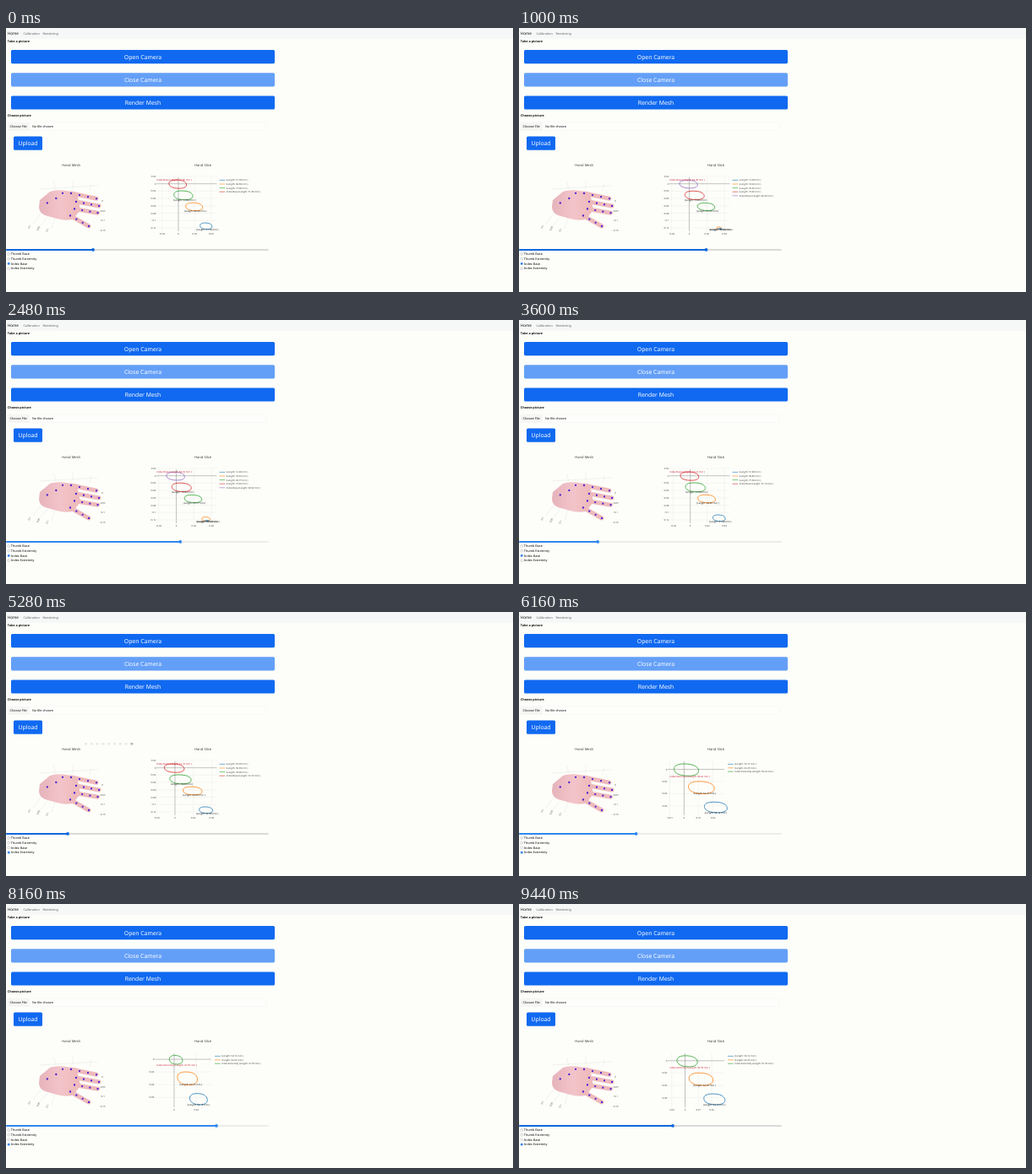
An HTML page for the animation above (9.8 s loop, 600 by 313 pixels).

```html
<!DOCTYPE html>
<html lang="en">
<head>
<meta charset="utf-8">
<title>Hand slices</title>
<style>
  html, body { margin: 0; width: 100%; height: 100%; overflow: hidden; background: #fdfefa; }
  svg { display: block; width: 600px; height: 313px; font: 3.75px "Noto Sans", sans-serif; fill: #111; text-rendering: geometricPrecision; }
  .button text { font-size: 6.85px; fill: #fff; text-anchor: middle; }
  .plot { font-family: "Open Sans", sans-serif; font-size: 2.85px; }
  .title { font-size: 4.1px; text-anchor: middle; }
</style>
</head>
<body>
<svg viewBox="0 0 600 313">
  <defs>
    <linearGradient id="skin">
      <stop offset="0" stop-color="#e6b3ba"/>
      <stop offset=".5" stop-color="#f2c4c9"/>
      <stop offset="1" stop-color="#eeb9b9"/>
    </linearGradient>
  </defs>
  <rect width="600" height="12.5" fill="#f6f8f7"/>
  <text x="1.8" y="7.8" font-size="4.6" font-weight="500">Home</text>
  <g fill="#666"><text x="20.5" y="7.6">Calibration</text><text x="43.5" y="7.6">Rendering</text></g>
  <g font-weight="700"><text x="1.8" y="17.2">Take a picture</text><text x="1.8" y="104.8">Choose picture</text></g>
  <g id="buttons" class="button"></g>
  <rect x="2" y="112" width="306" height="9.6" rx="1.2" fill="#fefefc" stroke="#ecedeb" stroke-width=".4"/>
  <rect x="2.2" y="112.2" width="25.6" height="9.2" fill="#f5f6f4"/>
  <text x="4.6" y="118.2">Choose File</text><text x="31" y="118.2">No file chosen</text>
  <g class="plot">
    <g class="title" fill="#333"><text x="77.2" y="164.3">Hand Mesh</text><text x="233" y="164.3">Hand Slice</text></g>
    <path d="M56 182l3 9M79 181v10M101 184l-2 9M39 191l70-4M32 232l10-14M41 234l8-10M54 238l4-13" fill="none" stroke="#dedede" stroke-width=".4"/>
    <path d="M40 204L52 194Q58 191.500 68 192.500L84 195L88 216L79 227Q70 229 60 226L46 222Q39 219 39 212Z" fill="url(#skin)"/>
    <g id="hand"></g>
    <g id="meshLabels" text-anchor="middle" fill="#444"></g>
    <g id="modebar" fill="#b8bab8"></g>
    <g id="chart"></g>
  </g>
  <rect id="track" y="262" width="311" height="1.9" rx=".9"/>
  <g id="thumb"><rect id="fill" y="262" height="1.9" rx=".9"/><circle id="knob" cy="262.900" r="1.900"/></g>
  <g id="radios"></g>
</svg>
<script>
const el = id => document.getElementById(id);
const text = (x, y, s, extra = '') => `<text x="${x}" y="${y}" ${extra}>${s}</text>`;
const lerp = (a, b, f) => a + (b - a) * f;
const clamp = (v, lo, hi) => Math.min(hi, Math.max(lo, v));

const LOOP = 9800, START = 103;
const COLORS = ['#1f77b4', '#ff7f0e', '#2ca02c', '#d62728', '#9467bd'];
const OPTIONS = ['Thumb Base', 'Thumb Extremity', 'Index Base', 'Index Extremity'];

// Slider drags: start, end, final position
const DRAGS = [[80, 1000, 221.5], [1080, 1560, 236], [1800, 2760, 194], [2800, 3760, 73],
  [5640, 6600, 194], [6640, 7520, 262], [7680, 8640, 236], [8680, 9440, 182]];

// Finger cross-sections from index to little finger: x, y, rx, ry in axis steps
const BASE = [[-.04, .05, .53, .57], [.3, 1.57, .57, .61], [.96, 3.13, .51, .54], [1.69, 5.75, .36, .43]];
const TIPS = [[.16, .04, .7, .41], [1.2, 1.5, .9, .51], [2.2, 3.13, .79, .44]];

// Knuckle and tip of each finger of the mesh
const FINGERS = [[77, 196, 107, 202.3], [83, 206, 110, 211], [81, 214.5, 108.5, 219.2], [76, 222.5, 98, 235]];

function slider(t) {
  let x = START;
  for (const [from, to, end] of DRAGS) x = lerp(x, end, clamp((t - from) / (to - from), 0, 1));
  return x;
}

// Axis origin and step, and the cut fingers, for a slider position
function baseSlice(s) {
  const few = s < 150;
  const dx = few ? clamp(19.4 + (START - s) * .077, 18.5, 22) : 20.85;
  const size = 1.05 - s * .0004, little = clamp((240 - s) / 50, .08, 1);
  const shapes = BASE.map(([x, y, rx, ry], i) => {
    const k = i === 3 ? little : 1;
    return [x, y + (1 - k) * ry, rx * size * k, ry * size * k];
  });
  if (!few) shapes.push([1.75, 6.12, .12, .06]);
  return { x0: 204 - (dx - 19.4) * 1.74, dx, y0: 184.7, dy: 8.72, shapes };
}

function tipSlice(s) {
  const d = Math.max(s, 150) - 182, first = 1.09 - d * .0037;
  const shapes = TIPS.map(([x, y, rx, ry], i) => i ? [x, y, rx, ry] : [x, y, rx * first, ry * first]);
  return { x0: 196.5 + d * .037, dx: 15.8 - d * .04, y0: 185.8 - d * .025, dy: 14.6 + d * .007, shapes };
}

function outline(cx, cy, rx, ry, color) {
  const round = v => Math.sign(v) * Math.abs(v) ** .88;
  let d = '';
  for (let i = 0; i < 40; i++) {
    const a = i * Math.PI / 20;
    d += `${i ? 'L' : 'M'}${(cx + rx * round(Math.cos(a))).toFixed(2)} ${(cy + ry * round(Math.sin(a + .15))).toFixed(2)}`;
  }
  return `<path d="${d}Z" fill="none" stroke="${color}" stroke-width=".8"/>`;
}

function drawChart(s, tips) {
  const { x0, dx, y0, dy, shapes } = tips ? tipSlice(s) : baseSlice(s);
  const left = tips ? 176 : 178, right = tips ? 243 : 249.5, unit = tips ? .01 : .02;
  const skip = tips && dx < 13.8 ? 2 : 1;
  const label = v => String(+v.toFixed(2)).replace('-', '−');
  let grid = '', zero = '', curves = '', notes = '';
  const line = (k, d) => {
    const path = `<path d="${d}" stroke="${k ? '#e8e9e7' : '#777'}" stroke-width=".45"/>`;
    k ? grid += path : zero += path;
  };
  for (let k = -2; k < 5; k++) {
    const x = x0 + k * dx;
    if (k % skip || x < left - .5 || x > right) continue;
    line(k, `M${x} 177V241`);
    notes += text(x, 244.9, label(k * unit), 'text-anchor="middle" fill="#444"');
  }
  for (let k = 1; k > -7; k--) {
    const y = y0 - k * dy;
    if (y < 175.9 || y > 240) continue;
    line(k, `M${left} ${y}H${right}`);
    notes += text(left - .6, y + 1, label(k * .02), 'text-anchor="end" fill="#444"');
  }
  shapes.forEach(([x, y, rx, ry], i) => {
    const row = shapes.length - 1 - i, color = COLORS[row];
    const cx = x0 + x * dx, cy = y0 + y * dy, h = ry * dy;
    const mm = 1.03 * 2 * Math.PI * Math.hypot(rx * unit, ry * .02) / Math.SQRT2 * 1000;
    const name = `${i ? '' : tips ? 'Index Extremity ' : 'Index Base '}(Length: ${mm.toFixed(2)} mm )`;
    const tx = i ? cx + (tips ? 8 - 4 * i : 1.5) : tips ? 202 : 199;
    const ty = i ? cy + h + 1 : tips ? cy + h + 1.7 : 181;
    const lx = tips ? 247 : 252.5, ly = 180.4 + row * (tips ? 4.4 : 4.6);
    curves += outline(cx, cy, rx * dx, h, color);
    notes += text(tx, ty, name, `text-anchor="middle" fill="${i ? '#111' : '#c8102a'}"`)
      + `<path d="M${lx} ${ly}h6.800" stroke="${color}" stroke-width=".6"/>`
      + text(lx + 8.3, ly + 1, name, 'font-size="2.75" fill="#333"');
  });
  el('chart').innerHTML = grid + zero + curves + notes;
}

function drawRadios(selected) {
  el('radios').innerHTML = OPTIONS.map((name, i) => {
    const y = 268 + i * 5.7, on = i === selected;
    return `<circle cx="3.200" cy="${y}" r="1.400" fill="#fff" stroke="${on ? '#1a73e8' : '#999'}" stroke-width=".4"/>`
      + (on ? `<circle cx="3.200" cy="${y}" r="1.100" fill="#1a73e8"/>` : '') + text(5.8, y + 1.3, name);
  }).join('');
}

function drawHand() {
  const dot = (x, y) => `<circle cx="${x}" cy="${y}" r="1.150" fill="#4a1fd0"/>`;
  let skin = '', dots = dot(48.8, 207.5) + dot(59.3, 202) + dot(67, 195.8);
  for (const [x, y, tx, ty] of FINGERS) {
    skin += `<path d="M${x} ${y}L${tx} ${ty}" stroke="#eebabc" stroke-width="5" stroke-linecap="round"/>`;
    for (let i = 0; i < 4; i++) dots += dot(lerp(x, tx, i / 3), lerp(y, ty, i / 3));
  }
  el('hand').innerHTML = skin + dots;
}

function drawStatic() {
  const button = (x, y, w, name, color = '#1069f0') =>
    `<rect x="${x}" y="${y}" width="${w}" height="16.200" rx="1.600" fill="${color}"/>` + text(x + w / 2, y + 10.5, name);
  el('buttons').innerHTML = button(6, 26, 312, 'Open Camera') + button(6, 53.2, 312, 'Close Camera', '#649ff7')
    + button(6, 80.4, 312, 'Render Mesh') + button(9, 128.6, 34, 'Upload');
  let labels = '', icons = '';
  ['0.1', '0.05', '0.1'].forEach((s, i) => {
    const x = 28.5 + i * 10.7, y = 236 + i * 2;
    labels += text(x, y, s, `transform="rotate(-65 ${x} ${y})"`);
  });
  ['0', '−0.05', '−0.1', '−0.15'].forEach((s, i) => labels += text(114, 206 + i * 11.6, s));
  for (let i = 0; i < 9; i++)
    icons += `<rect x="${93 + i * 6.8}" y="155" width="3" height="2.600" opacity="${i < 8 ? .3 : 1}"/>`;
  el('meshLabels').innerHTML = labels;
  el('modebar').innerHTML = icons;
}

function frame(now) {
  const t = Math.floor(now % LOOP / 40) * 40, s = slider(t);
  const dragging = DRAGS.some(([from, to]) => t > from && t < to);
  el('track').setAttribute('fill', dragging ? '#ececeb' : '#d9dad9');
  el('thumb').setAttribute('fill', dragging ? '#2f87ee' : '#0867dc');
  el('fill').setAttribute('width', s);
  el('knob').setAttribute('cx', s);
  el('modebar').style.display = t >= 4960 && t < 5400 || t >= 9000 && t < 9400 ? '' : 'none';
  drawRadios(t < 4560 ? 2 : 3);
  drawChart(s, t >= 5680);
  requestAnimationFrame(frame);
}

drawStatic();
drawHand();
frame(0);
</script>
</body>
</html>
```
